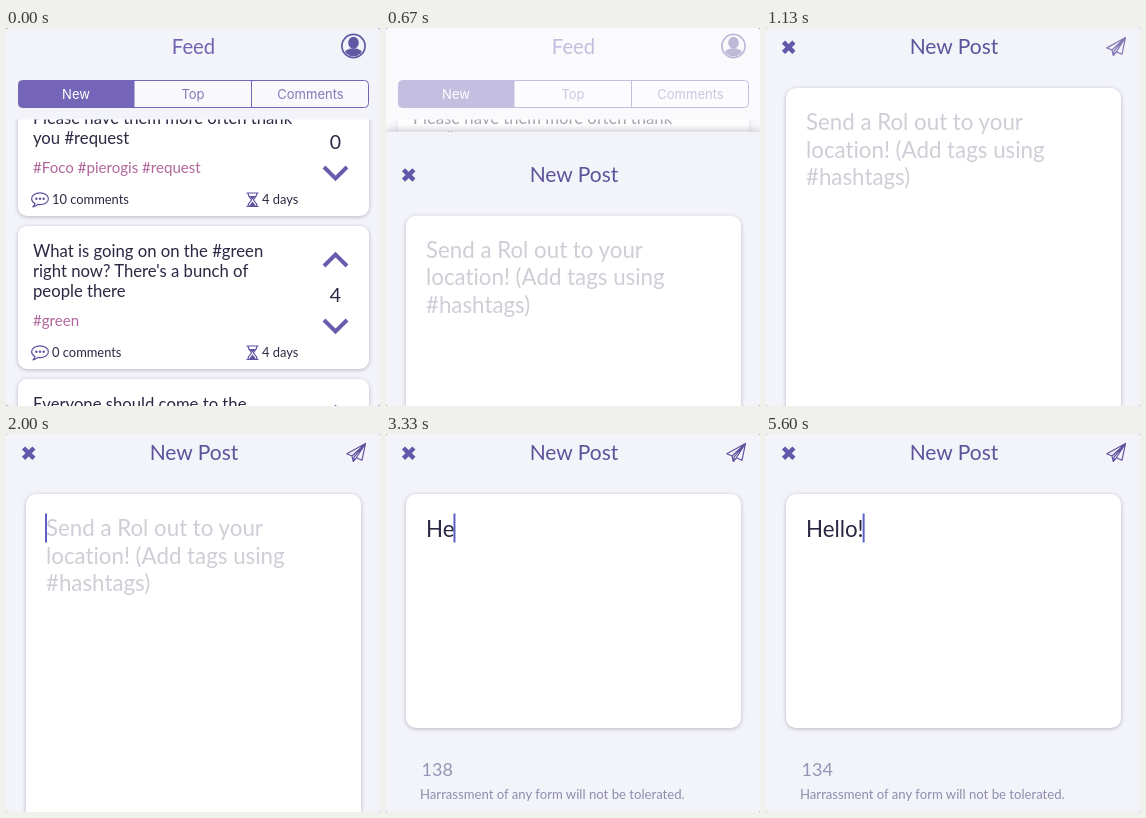
An HTML page for the animation above (5.74 s loop, 374x378 px).

```html
<!DOCTYPE html>
<html lang="en">
<head>
<meta charset="utf-8">
<title>New Post</title>
<style>
  html, body { margin: 0; width: 100%; height: 100%; overflow: hidden; background: #a3a3aa; }
  svg { display: block; width: 374px; height: 378px; border-radius: 3px; background: #f3f3fa; }
  text {
    font-family: Lato, "Open Sans", sans-serif; font-variant-ligatures: none;
    fill: #2b2843; white-space: pre;
  }
  .body { font-size: 16.7px; }
  .tags { font-size: 15.1px; fill: #b0669b; }
  .meta { font-size: 12.9px; }
  .votes { font-size: 19.5px; text-anchor: middle; }
  .tab { font: 13px Inter, Roboto, sans-serif; fill: #8479b6; text-anchor: middle; }
  .title { text-anchor: middle; }
  .entry { font-size: 22.3px; }
  .hint { fill: #cfced6; }
  .count { font-size: 18px; fill: #9794b5; }
  .note { font-size: 13.15px; fill: #8f8cae; }
  .card { fill: #fff; filter: drop-shadow(0 1px 2px rgba(50, 45, 80, .3)); }
  .line { fill: none; stroke: #5f539f; stroke-width: 1.2; stroke-linejoin: round; }
  .arrow { fill: none; stroke: #6a5cad; stroke-width: 4; }
  .sheet { fill: #f3f3fa; filter: drop-shadow(0 -1px 4px rgba(50, 45, 80, .3)); }
</style>
</head>
<body>
<svg viewBox="0 0 374 378">
  <defs>
    <g id="bubble">
      <path class="line" d="M29 11.6C26.8 10.4 25.6 8.7 25.6 6.8C25.6 3.4 29.4 .8 34 .8S42.4 3.4 42.4 6.8S38.6 12.6 34 12.6Q32.8 12.6 31.8 12.4Q29.8 14.4 27 14.8Q28.9 13.2 29 11.6Z"/>
      <g fill="#5f539f">
        <circle cx="30.4" cy="6.8" r="1.2"/><circle cx="34" cy="6.8" r="1.2"/><circle cx="37.6" cy="6.8" r="1.2"/>
      </g>
    </g>
    <g id="glass">
      <path class="line" d="M240.5 1H252.5M240.5 14.5H252.5M242 1C242 5.5 245.5 6 245.5 7.7S242 10 242 14.5M251 1C251 5.5 247.5 6 247.5 7.7S251 10 251 14.5"/>
      <path d="M243.5 4H249.5L246.5 7.5ZM243 14L246.5 9.5L250 14Z" fill="#5f539f"/>
    </g>
    <clipPath id="face"><circle cx="347.5" cy="18" r="10.3"/></clipPath>
    <clipPath id="list"><rect y="91.5" width="374" height="287"/></clipPath>
  </defs>

  <g id="feed">
    <g id="posts" clip-path="url(#list)"></g>
    <text class="title" x="187.5" y="26" font-size="20.3" style="fill:#7064b2">Feed</text>
    <g fill="#6258a3">
      <circle cx="347.5" cy="18" r="11.6" fill="none" stroke="#6258a3" stroke-width="1.7"/>
      <g clip-path="url(#face)">
        <ellipse cx="347.5" cy="14.8" rx="5.3" ry="6"/>
        <ellipse cx="347.5" cy="28" rx="10.5" ry="7.8"/>
      </g>
    </g>
    <rect x="12.5" y="52.5" width="350" height="27" rx="4" fill="#f8f8fd" stroke="#7466b6"/>
    <path d="M16.5 52.5H128.5V79.5H16.5Q12.5 79.5 12.5 75.5V56.5Q12.5 52.5 16.5 52.5Z" fill="#7465b8"/>
    <path d="M245.5 52.5V79.5" stroke="#7466b6"/>
    <text class="tab" x="70" y="70.5" style="fill:#fff">New</text>
    <text class="tab" x="187" y="70.5">Top</text>
    <text class="tab" x="304.5" y="70.5">Comments</text>
  </g>
  <rect id="veil" width="374" height="378" fill="#fff" opacity="0"/>

  <g id="modal">
    <rect class="sheet" y="-24" width="374" height="700"/>
    <path d="M17.5 14L27.9 24.4M27.9 14L17.5 24.4" stroke="#6257a8" stroke-width="4.5"/>
    <text class="title" x="188" y="26" font-size="21" style="fill:#5d539b">New Post</text>
    <path id="plane" class="line" d="M359.5 9.5L340.8 19.8L346 22L347.3 27.5L350.3 23.8L356 26.2ZM346 22L359.5 9.5L350.3 23.8M347.3 27.5L348.2 22.9L359.5 9.5"/>
    <rect id="box" class="card" x="20" y="60" width="335" height="234" rx="10"/>
    <g id="hint">
      <text class="entry hint" x="40" y="102">Send a Rol out to your</text>
      <text class="entry hint" x="40" y="129.5">location! (Add tags using</text>
      <text class="entry hint" x="40" y="157">#hashtags)</text>
    </g>
    <text id="typed" class="entry" x="40" y="102.5"></text>
    <rect id="caret" y="79.5" width="2" height="29" fill="#5b62c4"/>
    <g id="foot">
      <text id="count" class="count" x="35.5" y="342">140</text>
      <text class="note" x="34" y="364.5">Harrassment of any form will not be tolerated.</text>
    </g>
  </g>
</svg>

<script>
const LOOP = 5740, SCREEN = 667, KEYBOARD = 258, LIMIT = 140;
const MODAL_AT = 514.5, KEYS_AT = 2000;
const MESSAGE = "Hello!";
const KEY_TIMES = [3130, 3330, 3870, 4070, 4270, 4530];
const VEIL = [[40, 0], [200, .36], [400, .54], [600, .58]];
const PLANE = [[900, 0], [1200, 1]];
const CARET = [
  [1795, 0], [1800, 1], [2540, 1], [2670, 0], [2960, 0], [3070, 1],
  [4900, 1], [5130, 0], [5420, 0], [5600, 1]
];
const POSTS = [
  { y: 45, lines: ["Please have them more often thank", "you #request"],
    tags: "#Foco #pierogis #request", comments: 10, votes: 0, last: 71 },
  { y: 198, lines: ["What is going on on the #green", "right now? There's a bunch of", "people there"],
    tags: "#green", comments: 0, votes: 4, last: 71 },
  { y: 351, lines: ["Everyone should come to the"], tags: "", comments: 0, votes: 0, last: 31 }
];

const $ = id => document.getElementById(id);

const label = (kind, x, y, words) => `<text class="${kind}" x="${x}" y="${y}">${words}</text>`;

// Lines are set upward from the last baseline of each post.
function post({ y, lines, tags, comments, votes, last }) {
  const rows = lines.map((words, i) =>
    label("body", 27, last - 20.2 * (lines.length - 1 - i), words));
  return `<g transform="translate(0 ${y})">
    <rect class="card" x="12" width="351" height="143" rx="9"/>
    ${rows.join("")}
    ${label("tags", 27, 100, tags)}
    <use href="#bubble" y="119"/>
    ${label("meta", 46, 130.5, comments + " comments")}
    <use href="#glass" y="119"/>
    ${label("meta", 256, 130.5, "4 days")}
    <path class="arrow" d="M318 40L329.5 28.5L341 40"/>
    ${label("votes", 329.5, 76, votes)}
    <path class="arrow" d="M318 94L329.5 105.5L341 94"/>
  </g>`;
}

function track(steps, t) {
  if (t <= steps[0][0]) return steps[0][1];
  for (let i = 1; i < steps.length; i++) {
    const [a, from] = steps[i - 1], [b, to] = steps[i];
    if (t < b) return from + (to - from) * (t - a) / (b - a);
  }
  return steps[steps.length - 1][1];
}

// Critically damped spring: the part of the way still to go.
function remaining(ms) {
  const u = Math.max(0, ms) * .0195;
  return (1 + u) * Math.exp(-u);
}

function render(t) {
  const drop = SCREEN * remaining(t - MODAL_AT);
  const lift = KEYBOARD * remaining(t - KEYS_AT);
  const length = KEY_TIMES.filter(k => t >= k).length;

  $("veil").setAttribute("opacity", track(VEIL, t));
  $("modal").setAttribute("transform", `translate(0 ${drop.toFixed(2)})`);
  $("plane").setAttribute("opacity", track(PLANE, t));
  $("box").setAttribute("height", 234 + lift);
  $("foot").setAttribute("transform", `translate(0 ${lift.toFixed(2)})`);
  $("hint").setAttribute("visibility", length ? "hidden" : "visible");
  $("typed").textContent = MESSAGE.slice(0, length);
  $("count").textContent = LIMIT - length;
  $("caret").setAttribute("x", 39 + (length ? $("typed").getComputedTextLength() : 0));
  $("caret").setAttribute("opacity", track(CARET, t));
}

$("posts").innerHTML = POSTS.map(post).join("");
const start = performance.now();
function tick() {
  render((performance.now() - start) % LOOP);
  requestAnimationFrame(tick);
}
tick();
</script>
</body>
</html>
```
